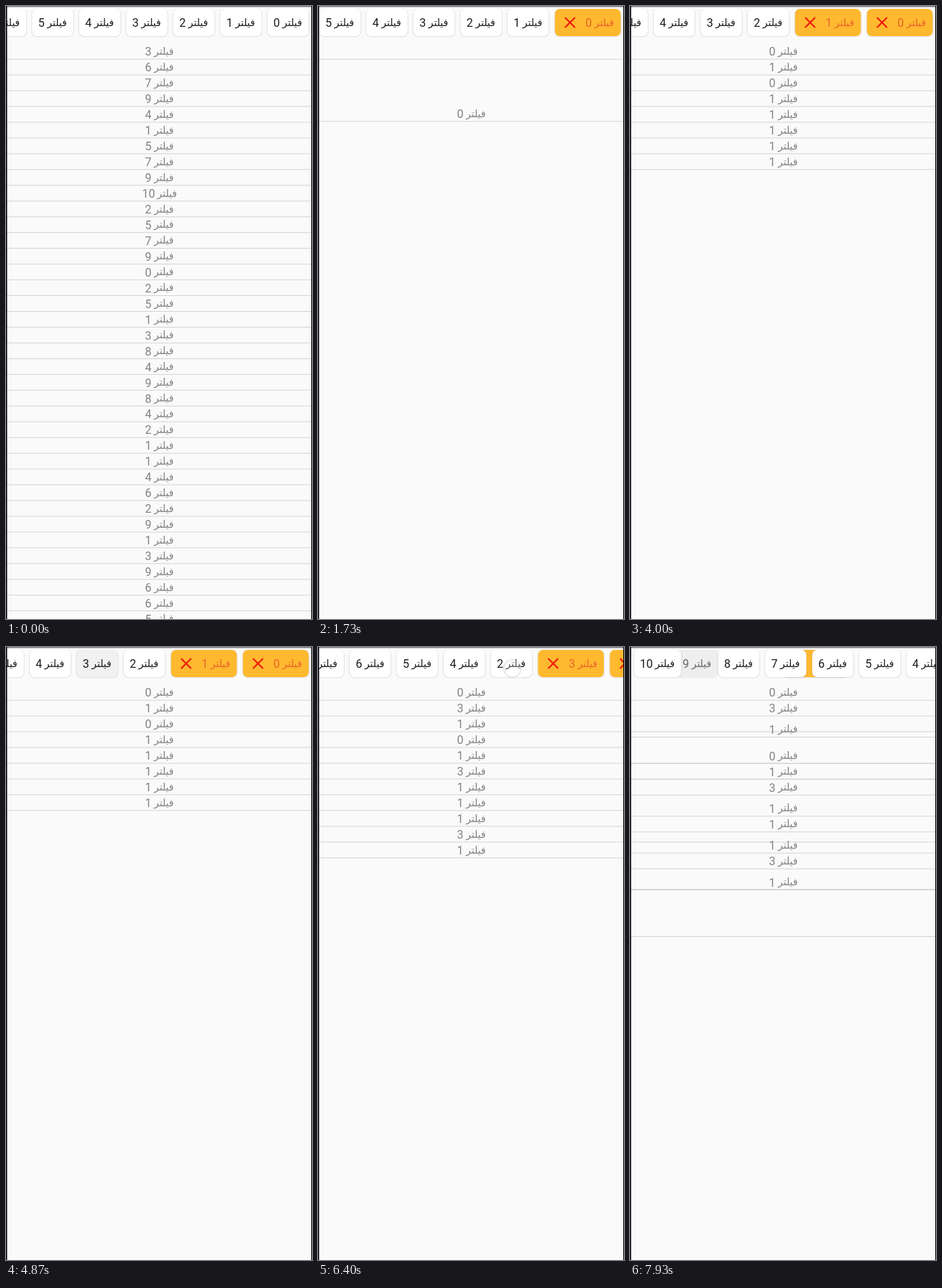
These frames come from a looping animation (426x854 px, 8 s). An HTML page:

```html
<!DOCTYPE html>
<html lang="fa">
<head>
<meta charset="utf-8">
<style>
  html, body { margin: 0; width: 100%; height: 100%; overflow: hidden; background: #fafafa; }
  svg { display: block; width: 426px; height: 854px; }
  .num { font: 16px Roboto, sans-serif; }
  .word { font: 14px "DejaVu Sans", sans-serif; text-anchor: end; }
</style>
</head>
<body>
<svg viewBox="0 0 426 854">
  <rect width="426" height="854" fill="#fafafa"/>
  <g id="rows"></g>
  <g id="chips"></g>
  <g id="touch"></g>
  <rect width="426" height="1.5" fill="#808080"/>
  <rect width="1.5" height="854" fill="#000"/>
  <rect x="425" width="1" height="854" fill="#000"/>
</svg>
<script>
const LOOP = 8000, PITCH = 21.96, MOVE = 250, FADE = 120;
const ITEMS = [0, 3, 6, 7, 9, 4, 1, 5, 7, 9, 10, 2, 5, 7, 9, 0, 2, 5, 1, 3, 8, 4, 9, 8, 4,
  2, 1, 1, 4, 6, 2, 9, 1, 3, 9, 6, 6, 5, 1];
const PICKS = [0, 1, 3, 9];
// at: animation start, press: finger down, drift: how far the fading chip slides
const STEPS = [
  { at: 1440, press: 1330, x: 391, y: 26, drift: -34.5 },
  { at: 3160, press: 3000, x: 291, y: 32, drift: -34.5 },
  { at: 4880, press: 4670, x: 127, y: 30, drift: 32 },
  { at: 7832, press: 7670, x: 101, y: 30, drift: -43 }
];
const MAX_SCROLL = 408.5, GROWTH = 34.5;

const clamp = v => Math.max(0, Math.min(1, v));
const lerp = (a, b, p) => a + (b - a) * p;
const ease = u => 0.5 - Math.cos(Math.PI * clamp(u)) / 2;
const layer = id => document.getElementById(id);

function label(n, right, base, color) {
  const left = right - (n > 9 ? 48.5 : 40);
  return `<g fill="${color}"><text class="num" x="${left}" y="${base}">${n}</text>` +
    `<text class="word" x="${right}" y="${base - 1.5}">فیلتر</text></g>`;
}

// Positions of the listed items after a number of picks
function listLayout(stage) {
  const places = new Map();
  ITEMS.forEach((n, i) => {
    if (!stage) places.set(i, i - 1);
    else if (PICKS.slice(0, stage).includes(n)) places.set(i, places.size);
  });
  return places;
}
const LISTS = [0, 1, 2, 3, 4].map(listLayout);

const divider = place =>
  `<rect y="${73.6 + place * PITCH}" width="426" height="1" fill="#d4d4d4"/>`;

function row(i, place, alpha) {
  const n = ITEMS[i];
  return `<g opacity="${alpha}">` +
    label(n, n > 9 ? 238 : 233.5, 69.4 + place * PITCH, '#828282') + '</g>';
}

function drawRows(stage, age) {
  const now = LISTS[stage], before = LISTS[stage - 1] || now;
  const delay = stage === 1 ? FADE : 0;
  const p = ease((age - delay) / MOVE);
  const gone = clamp(age / FADE), added = clamp((age - delay - MOVE) / FADE);
  let out = '';
  before.forEach((place, i) => {
    if (!now.has(i) && gone < 1 && place >= 0) out += divider(place) + row(i, place, 1 - gone);
  });
  now.forEach((place, i) => {
    if (place < 0) return;
    const kept = before.has(i) && before.get(i) >= 0;
    const at = kept ? lerp(before.get(i), place, p) : place;
    out += divider(at) + row(i, at, kept ? 1 : added);
  });
  return out;
}

const chipWidth = (n, on) => on ? 91.5 : n > 9 ? 65.5 : 57.5;

// Left edges of the chips, laid out from the right
function chipLayout(stage, scroll) {
  const order = PICKS.slice(0, stage), left = [];
  let right = 421.3 + scroll;
  for (let n = 0; n <= 10; n++) if (!order.includes(n)) order.push(n);
  order.forEach((n, k) => {
    const w = chipWidth(n, k < stage);
    left[n] = right - w;
    right -= w + (k < stage ? 8.5 : 8);
  });
  return left;
}

function chip(n, x, on, alpha = 1, fill = on ? '#ffb92f' : '#fff') {
  const w = chipWidth(n, on);
  const box = (grow, dy, extra) =>
    `<rect x="${x - grow}" y="${4 + dy}" width="${w + 2 * grow}" height="38" rx="7" ${extra}/>`;
  const cross = `<path d="M${x + 14} 16l14 14m0-14l-14 14" stroke="#ee1c0c" stroke-width="2.2"/>`;
  return `<g opacity="${alpha}">` +
    box(0.5, 0.6, 'fill="#000" fill-opacity=".07" stroke="#000" stroke-opacity=".05" stroke-width="1.6"') +
    box(0, 0, `fill="${fill}"`) + (on ? cross : '') +
    label(n, x + w - 9, 29.2, on ? '#e8642c' : '#1c1c1c') + '</g>';
}

function scrollAt(t) {
  if (t < 6400) return 176 * clamp((t - 6190) / 210) ** 1.3;
  return 176 + (MAX_SCROLL - 176) * (1 - (1 - clamp((t - 6400) / 1130)) ** 3);
}

function drawChips(stage, age, t) {
  const scroll = scrollAt(t), p = ease(age / MOVE);
  const now = chipLayout(stage, scroll + (stage === 4 ? GROWTH : 0));
  const before = stage ? chipLayout(stage - 1, scroll) : now;
  const changing = stage && p < 1 ? PICKS[stage - 1] : -1;
  const next = STEPS[stage];
  const pressed = next && t > next.press + 60 ? PICKS[stage] : -1;
  let under = '', out = '';
  now.forEach((x, n) => {
    const at = lerp(before[n], x, p);
    const on = PICKS.slice(0, stage).includes(n);
    if (n === changing) {
      under = chip(n, at, true, Math.min(1, 3 * p)) +
        chip(n, before[n] + STEPS[stage - 1].drift * p, false, 1 - p, '#e9e9e9');
    } else if (at < 440 && at > -100) {
      out += n === pressed ? chip(n, at, on, 1, '#f1f1f1') : chip(n, at, on);
    }
  });
  return under + out;
}

const ring = (x, y, alpha) =>
  `<circle cx="${x}" cy="${y}" r="12" fill="#fff" fill-opacity=".5" stroke="#c6c6d6" stroke-width="1.6" opacity="${alpha}"/>`;

function drawTouch(t) {
  const tap = STEPS.find(s => t >= s.press - 5 && t < s.press + 130);
  if (tap) return ring(tap.x, tap.y, 1);
  if (t >= 6195 && t < 6450) return ring(94 + scrollAt(t), 30, t < 6380 ? 0.9 : 0.5);
  return '';
}

function render(t) {
  const stage = STEPS.filter(s => t >= s.at).length;
  const age = stage ? t - STEPS[stage - 1].at : LOOP;
  layer('rows').innerHTML = drawRows(stage, age);
  layer('chips').innerHTML = drawChips(stage, age, t);
  layer('touch').innerHTML = drawTouch(t);
}

const start = performance.now();
function tick() {
  render((performance.now() - start) % LOOP);
  requestAnimationFrame(tick);
}
tick();
</script>
</body>
</html>
```
